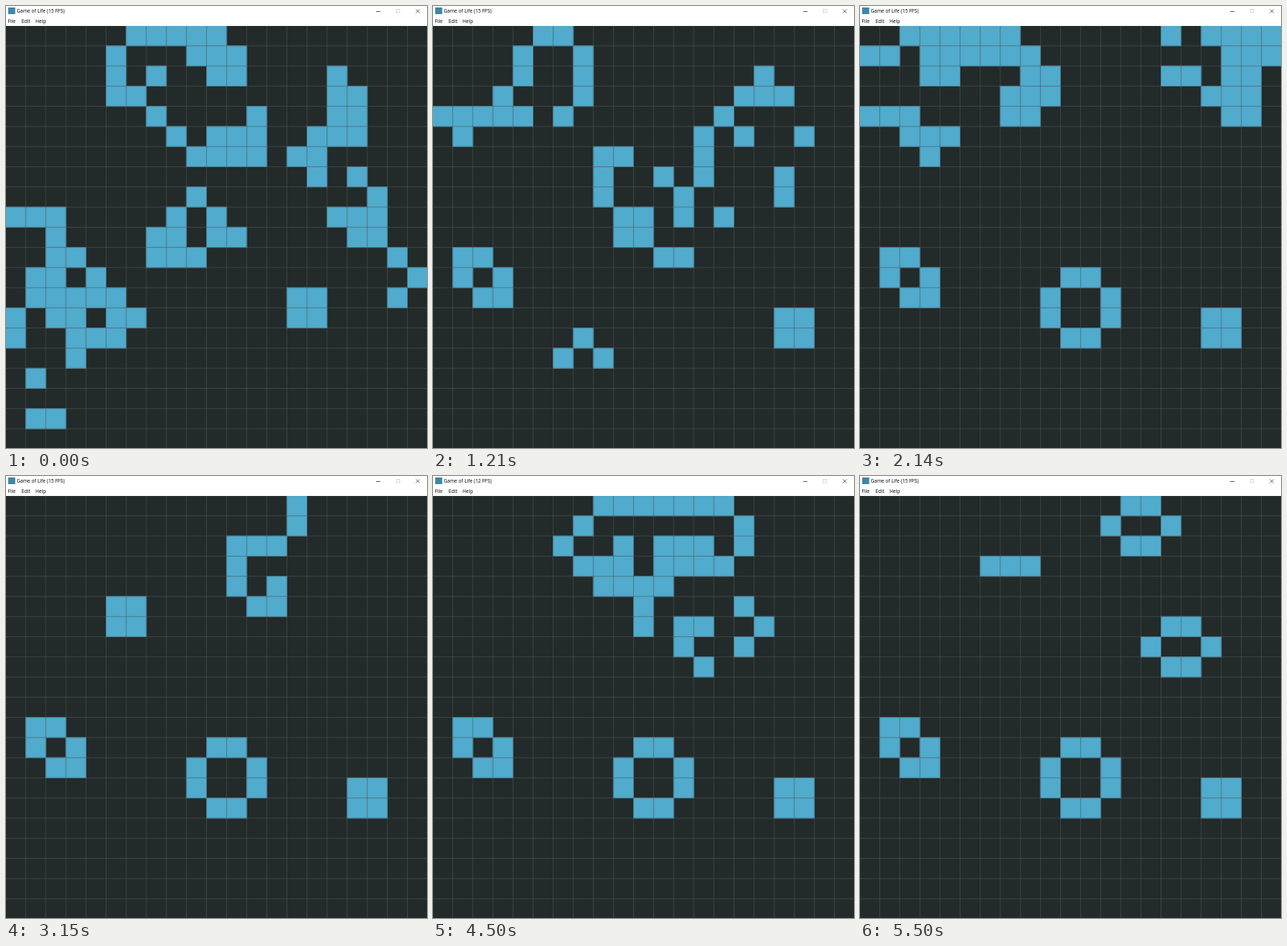
Write an HTML page with a canvas that moves like this. It is 570x598 px and loops after 5550 ms.

```html
<!DOCTYPE html>
<html lang="en">
<head>
<meta charset="utf-8">
<title>Game of Life</title>
<style>
  html, body { margin: 0; width: 100%; height: 100%; overflow: hidden; background: #232a2a; }
  svg, canvas { position: absolute; left: 0; top: 0; display: block; }
  text { font: 6.6px "Open Sans", "Noto Sans", sans-serif; fill: #000; }
</style>
</head>
<body>
<canvas id="board" width="570" height="598"></canvas>
<svg width="570" height="27">
  <rect width="570" height="27" fill="#fff"/>
  <rect x="3" y="2" width="9.5" height="9" fill="#3f87a3"/>
  <text id="title" x="14.5" y="9">Game of Life (15 FPS)</text>
  <text x="2.5" y="23">File</text>
  <text x="21" y="23">Edit</text>
  <text x="40" y="23">Help</text>
  <g fill="none" stroke="#333" stroke-width=".8">
    <path d="M501 7.5h6M555 4.5l5 5m0-5l-5 5"/>
    <rect x="528.5" y="4.5" width="4.5" height="4.5" stroke="#ccc"/>
  </g>
</svg>
<script>
const SIZE = 21, LOOP = 5550;

// Starting pattern in run-length (RLE) notation: b dead, o alive, $ next row
const seed = '6b5o$5bo3b3o$5bobo2b2o4bo$5b2o9b2o$7bo4bo3b2o$8bob3o2b3o$9b4ob2o$' +
  '15bobo$9bo8bo$3o5bobo5b3o$2bo4b2ob2o5b2o$2b2o3b3o9bo$b2obo15bo$' +
  'b5o8b2o3bo$ob2ob2o7b2o$o2b3o$3bo$bo2$b2o';

// Pace of the game as [ms, generation]; steady between these points
const pace = [[0, 0], [550, 8], [1210, 21], [2140, 36], [3150, 51],
  [4500, 74], [5500, 89], [LOOP, 89]];

function parse(rle) {
  const rows = rle.replace(/(\d+)(\D)/g, (_, n, c) => c.repeat(n)).split('$');
  return Array.from({ length: SIZE }, (_, r) =>
    Array.from({ length: SIZE }, (_, c) => +(rows[r]?.[c] === 'o')));
}

// Cells outside the board count as dead
function next(grid) {
  return grid.map((row, r) => row.map((alive, c) => {
    let sum = 0;
    for (let y = r - 1; y <= r + 1; y++)
      for (let x = c - 1; x <= c + 1; x++) sum += grid[y]?.[x] || 0;
    return +(sum === 3 || (alive && sum === 4));
  }));
}

const grids = [parse(seed)];
while (grids.length <= pace.at(-1)[1]) grids.push(next(grids.at(-1)));

function generationAt(t) {
  const i = pace.findLastIndex(([ms]) => ms <= t);
  const [t0, g0] = pace[i], [t1, g1] = pace[i + 1];
  return Math.floor(g0 + (g1 - g0) * (t - t0) / (t1 - t0));
}

const ctx = document.getElementById('board').getContext('2d');
const title = document.getElementById('title');
const W = 27.2, H = 27.27;
const left = c => W * c - 1;
const top_ = r => H * r + 26.1;
let shown = -1;

function draw(gen) {
  ctx.fillStyle = '#232a2a';
  ctx.fillRect(0, 0, 570, 598);
  // Each cell also covers the grid lines on all four of its sides
  ctx.fillStyle = '#50abcd';
  grids[gen].forEach((row, r) => row.forEach((alive, c) => {
    if (alive) ctx.fillRect(left(c), top_(r), W + 1, H + 1);
  }));
  ctx.fillStyle = 'rgba(80,86,86,.6)';
  for (let i = 0; i < SIZE; i++) {
    ctx.fillRect(left(i), 27, 1, 571);
    ctx.fillRect(0, top_(i), 570, 1);
  }
  // The frame rate dips for one generation in nine
  title.textContent = `Game of Life (${gen % 9 === 2 ? 12 : 15} FPS)`;
}

function tick() {
  const gen = generationAt(performance.now() % LOOP);
  if (gen !== shown) draw(shown = gen);
  requestAnimationFrame(tick);
}
tick();
</script>
</body>
</html>
```
